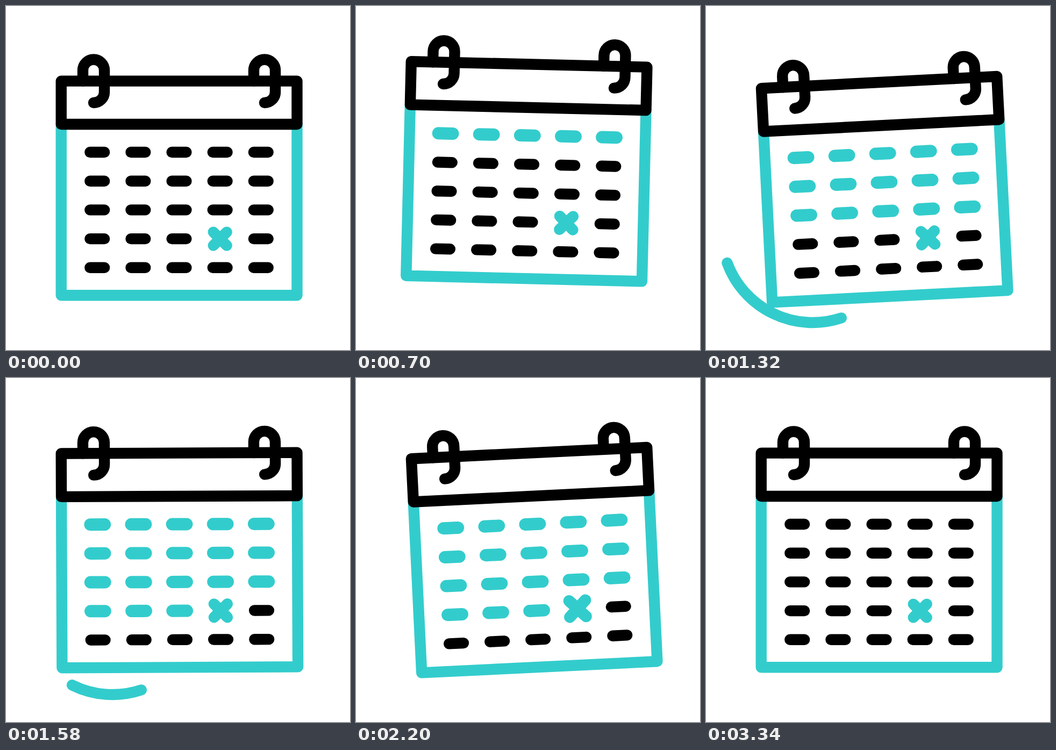
An HTML page for the animation above (3600 ms loop, 640 by 640 pixels).

```html
<!DOCTYPE html>
<html lang="en">
<head>
<meta charset="utf-8">
<title>Calendar</title>
<style>
  html, body { margin: 0; width: 100%; height: 100%; overflow: hidden; background: #fff; }
  svg { display: block; width: 100vw; height: 100vh; }
  path { fill: none; stroke-width: 20.4; stroke-linecap: round; stroke-linejoin: round; }
  .ink { stroke: #000; }
  .teal { stroke: #3cc; }
  .mark { stroke-width: 23; }
  .bigCross { stroke-width: 21.5; }
</style>
</head>
<body>
<svg viewBox="0 0 640 640">
  <path id="swoosh" class="teal"/>
  <g id="calendar">
    <path class="teal" d="M102.7 220V538.3H541.5V220"/>
    <g id="days"></g>
    <path class="teal" id="cross"/>
    <g id="marks"></g>
    <path class="ink" d="M102.7 139.6H541.5V220H102.7Z"/>
    <path class="ink" d="M143 139.6V119.5a20 20 0 0 1 40 0V160a20 20 0 0 1-20 20"/>
    <path class="ink" d="M461 139.6V119.5a20 20 0 0 1 40 0V160a20 20 0 0 1-20 20"/>
  </g>
</svg>
<script>
const LOOP = 3600, STEP = 20;
const PIVOT = { x: 322, y: 140 };
const ARC = { x: 198.5, y: 419.5, r: 169.5, from: 159.8, to: 71.7 };
const CROSS = { x: 398.2, y: 433.1 };
const HALF_DASH = 13.4;

// Keys are [time, value] pairs with an ease between neighbours.
const SWING = [[545, 0], [875, 3], [1355, -3], [1830, 3], [2250, -3], [2690, 0]];
const HOP = [[240, 0], [603, -41], [970, 16], [1437, 0]];
const ROW_START = 450, ROW_GAP = 290, ROW_TIME = 200;

const $ = id => document.getElementById(id);
const clamp = u => Math.min(1, Math.max(0, u));
const span = (t, a, b) => clamp((t - a) / (b - a));
const ease = u => u * u * (3 - 2 * u);
const easedSpan = (t, a, b) => ease(span(t, a, b));

function track(keys, t) {
  let value = keys[0][1];
  for (let i = 1; i < keys.length; i++) {
    const [a, from] = keys[i - 1], [b, to] = keys[i];
    value += (to - from) * easedSpan(t, a, b);
  }
  return value;
}

function addPath(parent, className, d = '') {
  const path = document.createElementNS('http://www.w3.org/2000/svg', 'path');
  path.setAttribute('class', className);
  path.setAttribute('d', d);
  return parent.appendChild(path);
}

const dash = (x, y, amount = 1) =>
  `M${x - HALF_DASH} ${y}h${2 * HALF_DASH * amount}`;

const crossPath = r =>
  `M${CROSS.x - r} ${CROSS.y - r}l${2 * r} ${2 * r}m0 ${-2 * r}l${-2 * r} ${2 * r}`;

function arcPath(start, end) {
  const point = u => {
    const angle = (ARC.from + (ARC.to - ARC.from) * u) * Math.PI / 180;
    return `${ARC.x + ARC.r * Math.cos(angle)} ${ARC.y + ARC.r * Math.sin(angle)}`;
  };
  return `M${point(start)}A${ARC.r} ${ARC.r} 0 0 0 ${point(end)}`;
}

const marks = [];
for (let row = 0; row < 5; row++) {
  for (let col = 0; col < 5; col++) {
    if (row === 3 && col === 3) continue;
    const x = 169.7 + 76.15 * col, y = 272 + 53.7 * row;
    addPath($('days'), 'ink', dash(x, y));
    const passed = row < 3 || (row === 3 && col < 3);
    if (passed) marks.push({ x, y, row, path: addPath($('marks'), 'teal mark') });
  }
}
$('cross').setAttribute('d', crossPath(12.5));
const bigCross = addPath($('marks'), 'teal bigCross');

function rowProgress(t, row) {
  const start = ROW_START + ROW_GAP * row;
  return easedSpan(t, start, start + ROW_TIME);
}

function draw(t) {
  $('calendar').setAttribute('transform',
    `translate(0 ${track(HOP, t)}) rotate(${track(SWING, t)} ${PIVOT.x} ${PIVOT.y})`);

  for (const { x, y, row, path } of marks) {
    const amount = rowProgress(t, row);
    path.setAttribute('d', amount > 0 ? dash(x, y, amount) : '');
  }
  const growth = rowProgress(t, 4);
  bigCross.setAttribute('d', growth > 0 ? crossPath(12.5 + 2.6 * growth) : '');
  $('marks').setAttribute('opacity', 1 - span(t, 2940, 3340));

  const head = easedSpan(t, 860, 1320), tail = easedSpan(t, 1345, 1820);
  $('swoosh').setAttribute('d', head > tail ? arcPath(tail, head) : '');
}

const begin = performance.now();
function tick() {
  const t = (performance.now() - begin) % LOOP;
  draw(Math.floor(t / STEP) * STEP);
  requestAnimationFrame(tick);
}
tick();
</script>
</body>
</html>
```
